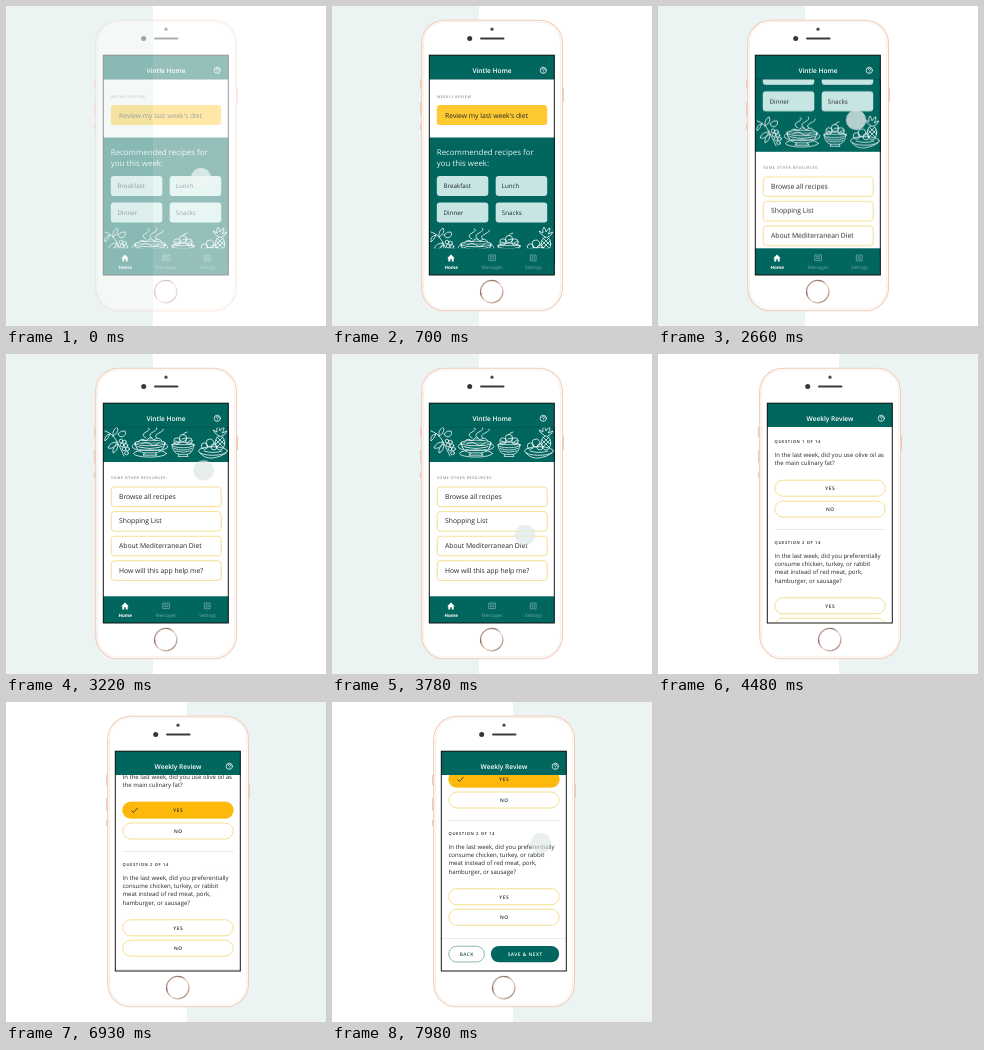
Write an HTML page that moves like this. It is 320 px wide and 320 px high and loops after 8000 ms.

```html
<!DOCTYPE html>
<html lang="en">
<head>
<meta charset="utf-8">
<title>Diet app walkthrough</title>
<style>
  html, body { margin: 0; width: 100%; height: 100%; overflow: hidden; background: #fff; }
  svg { display: block; width: 100%; height: 100%; }
  text { font-family: "Open Sans", "Noto Sans", sans-serif; fill: #20282a; text-rendering: geometricPrecision; }

  .panel { fill: #ecf4f3; }
  .green { fill: #00665e; }
  .frame { fill: none; stroke: #151515; }
  .title { font-size: 6.6px; font-weight: 600; fill: #fff; text-anchor: middle; }
  .line { fill: none; stroke: #fff; stroke-width: .75; stroke-linecap: round; stroke-linejoin: round; }
  .nav { font-size: 4.6px; text-anchor: middle; fill: #75aaa5; }
  .nav.on { font-weight: 700; fill: #fff; }
  .icon { fill: none; stroke: #75aaa5; stroke-width: .8; }
  .label { font-size: 3.6px; letter-spacing: .57px; fill: #5e6a6a; }
  .lead { font-size: 7.9px; fill: #e3f3f1; }
  .row { font-size: 6.8px; }
  .tile { fill: #c7e6e3; }
  .tile-text { font-size: 6.2px; }
  .outline { fill: #fff; stroke: #f4dc86; stroke-width: .9; }
  .number { font-size: 4.1px; font-weight: 600; letter-spacing: .62px; }
  .question { font-size: 6px; fill: #333c3d; }
  .choice { font-size: 4.8px; font-weight: 600; letter-spacing: .5px; text-anchor: middle; }
  .rule { stroke: #e4e8e8; stroke-width: .8; }
  .touch { fill: #dce8e6; fill-opacity: .82; stroke: #c9d8d6; stroke-opacity: .45; stroke-width: .6; }

  .anim { animation: 8s linear infinite both; }
  #panelHome { animation-name: panelHome; }
  #panelReview { animation-name: panelReview; }
  #home { animation-name: homeFade; }
  #review { animation-name: reviewFade; }
  #homePage { animation-name: homeScroll; }
  #reviewPage { animation-name: reviewScroll; }
  #picked { animation-name: pick; }
  #homeTouch { animation-name: homeTouch; }
  #reviewTouch { animation-name: reviewTouch; }

  @keyframes panelHome { 0%, 49.99% { opacity: 1 } 50%, 100% { opacity: 0 } }
  @keyframes panelReview { 0%, 49.99% { opacity: 0 } 50%, 100% { opacity: 1 } }
  @keyframes homeFade { 0% { opacity: .42 } 5%, 48.1% { opacity: 1 } 50%, 100% { opacity: 0 } }
  @keyframes reviewFade { 0%, 50% { opacity: 0 } 54.2%, 100% { opacity: 1 } }
  @keyframes homeScroll {
    0%, 27% { transform: translateY(0); animation-timing-function: ease-in }
    33.25% { transform: translateY(-111px); animation-timing-function: ease-out }
    37.5%, 100% { transform: translateY(-149px) }
  }
  @keyframes reviewScroll {
    0%, 77% { transform: translateY(0); animation-timing-function: ease-in-out }
    84%, 88% { transform: translateY(-26px); animation-timing-function: ease-in-out }
    95.5%, 100% { transform: translateY(-57px) }
  }
  @keyframes pick { 0%, 64.4% { opacity: 0 } 66%, 100% { opacity: 1 } }
  @keyframes homeTouch {
    0% { transform: translate(195px, 172px); opacity: .9 }
    5% { transform: translate(195px, 172px); opacity: 0 }
    20.5% { transform: translate(193px, 217px); opacity: 0 }
    24%, 27% { transform: translate(193px, 217px); opacity: .95; animation-timing-function: ease-in }
    33.25% { transform: translate(198px, 114px); opacity: 1; animation-timing-function: ease-out }
    37.5% { transform: translate(199px, 98px); opacity: .9; animation-timing-function: ease-in-out }
    46%, 47.3% { transform: translate(193px, 181px); opacity: .8 }
    49%, 100% { transform: translate(193px, 181px); opacity: 0 }
  }
  @keyframes reviewTouch {
    0%, 60.5% { transform: translate(207px, 145px); opacity: 0 }
    62.2% { transform: translate(207px, 145px); opacity: .8; animation-timing-function: ease-out }
    64%, 77% { transform: translate(203px, 137px); opacity: .82; animation-timing-function: ease-in-out }
    83% { transform: translate(205px, 111px); opacity: .7 }
    85%, 86.5% { transform: translate(205px, 111px); opacity: 0 }
    86.6% { transform: translate(209px, 172px); opacity: 0 }
    88% { transform: translate(209px, 172px); opacity: .85; animation-timing-function: ease-in-out }
    95.5%, 97.5% { transform: translate(209px, 141px); opacity: .9 }
    100% { transform: translate(209px, 141px); opacity: .75 }
  }
</style>
</head>
<body>
<svg viewBox="0 0 320 320">
  <defs>
    <linearGradient id="ring" x1="0" y1="0" x2="1" y2="1">
      <stop offset="0" stop-color="#f2ddd0"/>
      <stop offset=".3" stop-color="#8a6d60"/>
      <stop offset=".55" stop-color="#f0dfd4"/>
      <stop offset="1" stop-color="#9a7565"/>
    </linearGradient>
    <clipPath id="screen"><rect x="97" y="73" width="125.5" height="196"/></clipPath>

    <g id="phone">
      <path d="M88.8 73v10M88.8 96v13M88.8 118v6M231.2 82v14" stroke="#edc6b2" stroke-width="1.4"/>
      <rect x="89.7" y="14.2" width="140.8" height="290.6" rx="23" fill="#fff" stroke="#f0cdba" stroke-width="1.1"/>
      <rect x="91.6" y="16" width="137" height="287" rx="21" fill="none" stroke="#f8ebe4" stroke-width=".8"/>
      <path d="M89.2 40h2.4M228.6 40h2.4M89.2 280h2.4M228.6 280h2.4" stroke="#e7d5cb"/>
      <circle cx="160" cy="23.2" r="1.6" fill="#4a4a4a"/>
      <circle cx="137.7" cy="32.5" r="2.5" fill="#373737"/>
      <rect x="148" y="31.5" width="24.5" height="2.1" rx="1" fill="#3d3d3d"/>
      <circle cx="159.7" cy="285.6" r="11.2" fill="#fff" stroke="url(#ring)" stroke-width="1.3"/>
      <rect x="97" y="49" width="125.5" height="220" fill="#fff"/>
    </g>

    <g id="header">
      <rect class="green" x="97" y="49" width="125.5" height="24"/>
      <circle class="line" cx="211.3" cy="64.3" r="3.1"/>
      <path class="line" d="M210.2 63.5q.1-1.2 1.2-1.2q1.2.1 1.1 1.1q-.1.6-1.1 1.3M211.4 66v.1"/>
    </g>

    <g id="tile"><rect class="tile" width="51.5" height="20" rx="3"/></g>
    <rect id="row" class="outline" x="105.2" width="110" height="19.6" rx="3.2"/>
    <rect id="pill" class="outline" x="104.8" width="110.4" height="16" rx="8"/>

    <g id="bowl">
      <path d="M-11 0q1 10 7 11h8q6-1 7-11zM-4 11l-1 2.5h10l-1-2.5"/>
      <ellipse rx="11.3" ry="3.2"/>
      <path d="M-9 4q9 4 18 0M-8 7q8 3 16 0"/>
    </g>
  </defs>

  <rect id="panelHome" class="panel anim" width="147" height="320"/>
  <rect id="panelReview" class="panel anim" x="181" width="139" height="320"/>

  <g id="home" class="anim">
    <use href="#phone"/>
    <g clip-path="url(#screen)">
      <g id="homePage" class="anim">
        <text class="label" x="105" y="91.5">WEEKLY REVIEW</text>
        <rect x="104.8" y="99" width="110.4" height="20" rx="3.2" fill="#fec931"/>
        <text class="row" x="113" y="111.5">Review my last week's diet</text>

        <rect class="green" x="97" y="131.5" width="126" height="125.5"/>
        <text class="lead" x="104.8" y="149">Recommended recipes for</text>
        <text class="lead" x="104.8" y="159.8">you this week:</text>
        <use href="#tile" x="104.8" y="170"/><use href="#tile" x="163.7" y="170"/>
        <use href="#tile" x="104.8" y="196.4"/><use href="#tile" x="163.7" y="196.4"/>
        <g class="tile-text">
          <text x="111.6" y="182.2">Breakfast</text><text x="169.8" y="182.2">Lunch</text>
          <text x="111.6" y="208.6">Dinner</text><text x="169.8" y="208.6">Snacks</text>
        </g>

        <g class="line">
          <!-- vine -->
          <path d="M99 226q7 2 11 9t8 16M104 229q-2 5-5 7q-1-6 5-7M107 231q-1-6 4-9q3 5-4 9M111 237q-7 0-9 6q6 2 9-6M112 239q-6 3-5 9q5-2 5-9"/>
          <path d="M112 229q3-4 7-3q2 4-3 6q-3 0-4-3"/>
          <g fill="#00665e">
            <circle cx="115" cy="236" r="1.8"/><circle cx="118.5" cy="237" r="1.8"/><circle cx="116" cy="240" r="1.8"/>
            <circle cx="120" cy="240.5" r="1.8"/><circle cx="118" cy="244" r="1.8"/><circle cx="121.5" cy="244" r="1.8"/><circle cx="120.5" cy="248" r="1.8"/>
          </g>
          <!-- steaming dish -->
          <path d="M140 233q-6-3 0-6t2-4M146 233q-5-3 1-6t3-5M151 233q-4-2 2-5t4-4"/>
          <use href="#bowl" transform="translate(144 238) scale(1.35 .9)"/>
          <ellipse cx="144" cy="248.5" rx="16.5" ry="3.6"/>
          <path d="M132 237q4-5 8-1q4-6 8-1q5-4 8 1M135 239q5-3 9 0t9-1M129 239q-4 1-2 4l4 2M159 239q4 1 2 4l-4 2"/>
          <!-- fruit bowl -->
          <use href="#bowl" transform="translate(177 240) scale(1 .85)"/>
          <circle cx="171" cy="236" r="3.2"/><circle cx="177" cy="233" r="3.6"/><circle cx="183" cy="236" r="3.2"/>
          <path d="M177 230q1-3 4-3M169 236l4 1M176 234l4-1M182 237l3-2"/>
          <!-- platter -->
          <path d="M213 231q-5-3-6-6l4 2q-1-4 1-6q2 3 2 5q2-4 4-4q0 4-2 6l5-2q-2 4-5 5"/>
          <ellipse cx="214" cy="238" rx="4.7" ry="7"/>
          <path d="M210 235l7 7M211 232l7 7M218 235l-7 7M217 232l-7 7"/>
          <circle cx="204" cy="238" r="4"/><circle cx="198.5" cy="241" r="3.2"/><circle cx="208" cy="242" r="3"/>
          <ellipse cx="207" cy="246" rx="14.5" ry="4.3"/>
          <path d="M194 248q5 6 13 5t13-5M198 246q9 3 18 0"/>
        </g>

        <text class="label" x="105" y="274.2">SOME OTHER RESOURCES:</text>
        <use href="#row" y="282"/><use href="#row" y="306.6"/><use href="#row" y="331.2"/><use href="#row" y="355.8"/>
        <g class="row">
          <text x="113" y="293.8">Browse all recipes</text>
          <text x="113" y="318.4">Shopping List</text>
          <text x="113" y="343">About Mediterranean Diet</text>
          <text x="113" y="367.6">How will this app help me?</text>
        </g>
      </g>

      <rect class="green" x="97" y="242.3" width="126" height="27"/>
      <path d="M115.2 252.2l3.8-3.7l3.8 3.7h-1.1v3.3h-1.9v-2.3h-1.6v2.3h-1.9v-3.3z" fill="#fff"/>
      <path class="icon" d="M156.8 249h6.6v5.6h-6.6zM158 250.8h4.2M158 252.6h4.2"/>
      <path class="icon" d="M198.3 249h5.8v5.8h-5.8z"/><circle class="icon" cx="201.2" cy="251.9" r="1.4"/>
      <text class="nav on" x="119.3" y="262.6">Home</text>
      <text class="nav" x="160" y="262.6">Messages</text>
      <text class="nav" x="201.4" y="262.6">Settings</text>
    </g>
    <use href="#header"/>
    <text class="title" x="160" y="66.7">Vintle Home</text>
    <path d="M97 73.3h125.5" stroke="#004f49" stroke-width=".6"/>
    <rect class="frame" x="97.3" y="49.2" width="125" height="219.8"/>
    <circle id="homeTouch" class="touch anim" r="10"/>
  </g>

  <g id="review" class="anim">
    <g transform="translate(12 0)">
      <use href="#phone"/>
      <g clip-path="url(#screen)">
        <g id="reviewPage" class="anim">
          <text class="number" x="104.6" y="89.3">QUESTION 1 OF 14</text>
          <g class="question">
            <text x="104.5" y="103">In the last week, did you use olive oil as</text>
            <text x="104.5" y="111.2">the main culinary fat?</text>
          </g>
          <use href="#pill" y="126.2"/>
          <g id="picked" class="anim">
            <rect x="104.4" y="125.8" width="111.2" height="16.8" rx="8.4" fill="#fdb90b"/>
            <path d="M113.5 134.5l1.9 1.9l4.2-4.4" fill="none" stroke="#333" stroke-width=".9"/>
          </g>
          <use href="#pill" y="147"/>
          <text class="choice" x="160.2" y="136">YES</text>
          <text class="choice" x="160.2" y="156.8">NO</text>

          <path class="rule" d="M104.5 175.5h111"/>
          <text class="number" x="104.6" y="190.4">QUESTION 2 OF 14</text>
          <g class="question">
            <text x="104.5" y="204">In the last week, did you preferentially</text>
            <text x="104.5" y="212.2">consume chicken, turkey, or rabbit</text>
            <text x="104.5" y="220.4">meat instead of red meat, pork,</text>
            <text x="104.5" y="228.6">hamburger, or sausage?</text>
          </g>
          <use href="#pill" y="243.8"/>
          <use href="#pill" y="264.2"/>
          <text class="choice" x="160.2" y="253.6">YES</text>
          <text class="choice" x="160.2" y="274">NO</text>

          <path class="rule" d="M97 293.5h125"/>
          <rect x="104.8" y="301.2" width="35.6" height="15.8" rx="7.9" fill="#fff" stroke="#7fb1ac" stroke-width=".9"/>
          <rect class="green" x="146.8" y="300.9" width="68.4" height="16.4" rx="8.2"/>
          <text class="choice" x="122.8" y="310.9" style="fill:#2c5854">BACK</text>
          <text class="choice" x="181.2" y="310.9" style="fill:#fff">SAVE &amp; NEXT</text>
        </g>
      </g>
      <use href="#header"/>
      <text class="title" x="160" y="66.7">Weekly Review</text>
      <rect class="frame" x="97.3" y="49.2" width="125" height="219.8"/>
    </g>
    <circle id="reviewTouch" class="touch anim" r="10"/>
  </g>
</svg>
</body>
</html>
```
